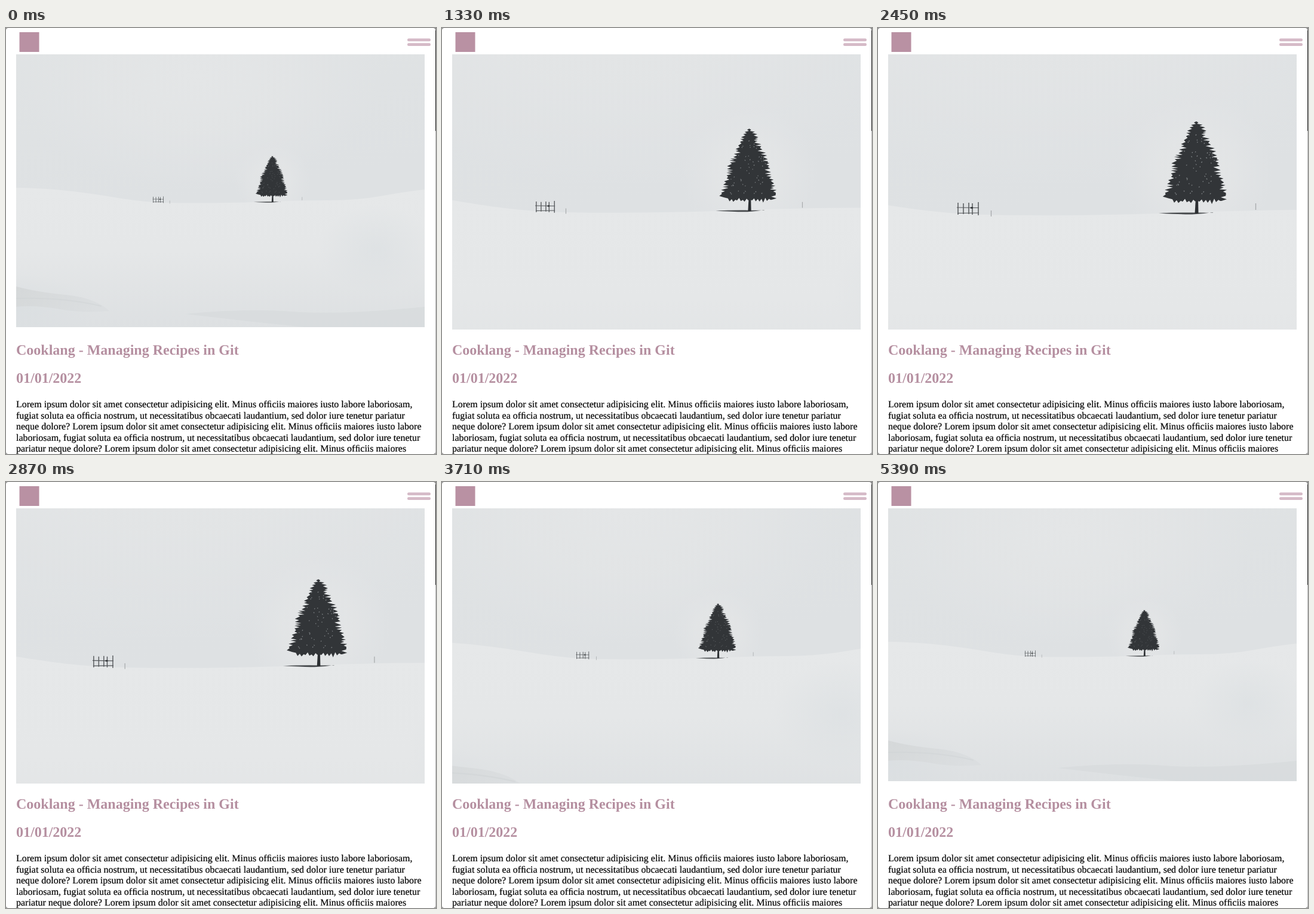
Write an HTML page that moves like this. It is 720 px wide and 712 px high and loops after 5530 ms.

```html
<!DOCTYPE html>
<html lang="en">
<head>
<meta charset="utf-8">
<title>Recipe post</title>
<style>
html, body { margin: 0; width: 100%; height: 100%; overflow: hidden; background: #fff; }
svg { display: block; width: 100vw; height: 100vh; }
text {
  font-family: "Liberation Serif", "Times New Roman", Times, serif;
  font-size: 16px;
  text-rendering: geometricPrecision;
}
.head { font-size: 24px; font-weight: bold; fill: #b58fa0; }
#body { stroke: #000; stroke-width: 0.2; }
</style>
</head>
<body>
<svg viewBox="0 0 720 712" xmlns="http://www.w3.org/2000/svg">
  <defs>
    <clipPath id="frame"><rect x="17" y="44" width="684" height="460"/></clipPath>
    <clipPath id="sheet"><rect x="17" y="44" width="684" height="456"/></clipPath>
    <linearGradient id="sky" x2="0.25" y2="1">
      <stop offset="0" stop-color="#e0e3e4"/>
      <stop offset="0.6" stop-color="#dee1e3"/>
    </linearGradient>
    <radialGradient id="glow">
      <stop offset="0" stop-color="#e4e6e7"/>
      <stop offset="0.5" stop-color="#e3e5e6" stop-opacity="0.8"/>
      <stop offset="1" stop-color="#e2e4e6" stop-opacity="0"/>
    </radialGradient>
    <linearGradient id="snow" x2="0" y2="1">
      <stop offset="0" stop-color="#e6e8e9"/>
      <stop offset="0.45" stop-color="#e5e7e8"/>
      <stop offset="1" stop-color="#dde0e2"/>
    </linearGradient>
    <radialGradient id="shade">
      <stop offset="0" stop-color="#d8dde0"/>
      <stop offset="1" stop-color="#d8dde0" stop-opacity="0"/>
    </radialGradient>
    <linearGradient id="drift" x2="1" y2="0.2">
      <stop offset="0" stop-color="#d5d8d9"/>
      <stop offset="1" stop-color="#dbdee0"/>
    </linearGradient>
  </defs>

  <rect width="720" height="712" fill="#858585"/>
  <rect width="719" height="712" rx="4" fill="#fff"/>
  <path d="M719 172V712h1V172z" fill="#b8b8b8"/>
  <path d="M719 4V172h1V4z" fill="#1c1c1c"/>

  <rect x="22.5" y="7" width="33" height="33" fill="#b991a3"/>
  <g fill="#d5bac7">
    <rect x="672" y="17.5" width="39" height="4.8" rx="2.2"/>
    <rect x="672" y="25.2" width="39" height="4.8" rx="2.2"/>
  </g>

  <g clip-path="url(#frame)">
    <g id="photo">
      <g clip-path="url(#sheet)">
        <rect x="17" y="44" width="684" height="456" fill="url(#sky)"/>
        <ellipse cx="320" cy="80" rx="310" ry="190" fill="url(#glow)"/>
        <ellipse cx="446" cy="255" rx="65" ry="65" fill="url(#glow)"/>
        <path d="M17 267C75 268 120 273 175 282S250 292 300 292.500Q360 293 430 290.500T540 288C615 288 640 276 701 270V500H17z" fill="url(#snow)"/>
        <ellipse cx="620" cy="370" rx="95" ry="75" fill="url(#shade)" opacity="0.5"/>
        <ellipse cx="17" cy="470" rx="130" ry="60" fill="url(#shade)" opacity="0.6"/>
        <path d="M17 432Q50 441 100 446T173 473Q130 477 90 470T17 466z" fill="url(#drift)"/>
        <path d="M300 478Q400 468 480 474T701 466V500H500Q400 490 300 478z" fill="#d7dbdd" opacity="0.75"/>
        <path d="M17 452Q100 450 160 465" fill="none" stroke="#d0d4d6" stroke-width="2" opacity="0.5"/>
      </g>
      <g transform="matrix(.5 0 0 .5 179.5 136)" fill="none" stroke="#55585b">
        <path d="M134 292v20M143 293v18M152 292v19M158 293v19M168 291v22" stroke-width="1.5"/>
        <path d="M132 300l37 .5M133 309.500l36-.5" stroke-width="1.2"/>
        <path d="M155 300.500h4" stroke="#2d3033" stroke-width="2.5"/>
        <path d="M189.500 305v10M632.500 293v11" stroke="#a6a9ab" stroke-width="1.3"/>
        <path d="M470 309.500Q500 308 534 308.500T560 308Q545 310.500 530 311.300T470 309.500z" fill="#45484b" stroke="none"/>
        <path d="M532 285L530.500 310H536.500L536 285z" fill="#2c2f32" stroke="none"/>
        <path id="tree" fill="#323538" stroke="none"/>
        <path id="gaps" stroke="#7d8184" stroke-width="1.3"/>
      </g>
    </g>
  </g>

  <text class="head" x="17" y="545.5">Cooklang - Managing Recipes in Git</text>
  <text class="head" x="17" y="592.5">01/01/2022</text>
  <g id="body"></g>
</svg>
<script>
const LOOP = 5530, TICK = 70, SPAN = 2100, GROW = 310, SHRINK = 2635;
const get = id => document.getElementById(id);

const lines = [
  "Lorem ipsum dolor sit amet consectetur adipisicing elit. Minus officiis maiores iusto labore laboriosam,",
  "fugiat soluta ea officia nostrum, ut necessitatibus obcaecati laudantium, sed dolor iure tenetur pariatur",
  "neque dolore? Lorem ipsum dolor sit amet consectetur adipisicing elit. Minus officiis maiores iusto labore",
  "laboriosam, fugiat soluta ea officia nostrum, ut necessitatibus obcaecati laudantium, sed dolor iure tenetur",
  "pariatur neque dolore? Lorem ipsum dolor sit amet consectetur adipisicing elit. Minus officiis maiores"
];
// The font lacks automatic ligatures, so "fi" is joined here.
get("body").innerHTML = lines
  .map((s, i) => `<text x="17" y="${634 + 18.5 * i}">${s.replace(/fi/g, "\uFB01")}</text>`).join("");

let seed = 11;
function rnd() {
  seed = (seed * 16807) % 2147483647;
  return seed / 2147483647;
}

// Half widths of the fir, as [depth below the tip, width]
const leftEdge = [[0, 2], [6, 10], [20, 16], [34, 23], [50, 31], [66, 40], [80, 42], [96, 45], [110, 49], [122, 56], [134, 46]];
const rightEdge = [[0, 3], [6, 12], [20, 16], [34, 23], [50, 32], [66, 40], [80, 38], [96, 44], [110, 48], [118, 52], [134, 47]];

function widthAt(edge, y) {
  const i = Math.max(1, edge.findIndex(p => p[0] >= y));
  const [y0, w0] = edge[i - 1], [y1, w1] = edge[i];
  return w0 + (w1 - w0) * (y - y0) / (y1 - y0);
}

function side(edge, dir) {
  const pts = [];
  for (let y = 1; y < 130; y += 3 + rnd() * 4) {
    const w = widthAt(edge, y);
    pts.push([533 + dir * (w + rnd() * 5 - 2.5), 157 + y]);
    pts.push([533 + dir * (w - 2 - rnd() * Math.min(9, w * 0.4)), 159 + y + rnd()]);
  }
  return pts;
}

function growTree() {
  const skirt = [];
  for (let x = 40; x >= -40; x -= 7) {
    skirt.push([533 + x, 289 + rnd() * 6], [530 + x, 285 + rnd() * 5]);
  }
  const pts = [[533, 156], ...side(rightEdge, 1), ...skirt, ...side(leftEdge, -1).reverse()];
  get("tree").setAttribute("d", "M" + pts.map(p => p.map(v => v.toFixed(1)).join(" ")).join("L") + "z");

  let gaps = "";
  for (let i = 0; i < 60; i++) {
    const y = 20 + rnd() * 106;
    const x = (rnd() * 2 - 1) * widthAt(leftEdge, y) * 0.8;
    gaps += `M${(533 + x).toFixed(1)} ${(157 + y).toFixed(1)}l${(rnd() * 3 - 1.5).toFixed(1)} 1.5`;
  }
  get("gaps").setAttribute("d", gaps);
}

// cubic-bezier(.25, .1, .25, 1)
function ease(p) {
  if (p <= 0) return 0;
  if (p >= 1) return 1;
  const curve = (s, a, b) => 3 * a * s * (1 - s) ** 2 + 3 * b * s * s * (1 - s) + s ** 3;
  let lo = 0, hi = 1;
  for (let i = 0; i < 24; i++) {
    const mid = (lo + hi) / 2;
    if (curve(mid, 0.25, 0.25) < p) lo = mid; else hi = mid;
  }
  return curve(lo, 0.1, 1);
}

function draw(now) {
  const t = Math.floor((now % LOOP) / TICK) * TICK;
  const zoom = 1 + ease((t - GROW) / SPAN) - ease((t - SHRINK) / SPAN);
  get("photo").setAttribute("transform", `translate(359 272) scale(${zoom.toFixed(4)}) translate(-359 -272)`);
}

growTree();
draw(0);
const start = performance.now();
(function frame() {
  draw(performance.now() - start);
  requestAnimationFrame(frame);
})();
</script>
</body>
</html>
```
